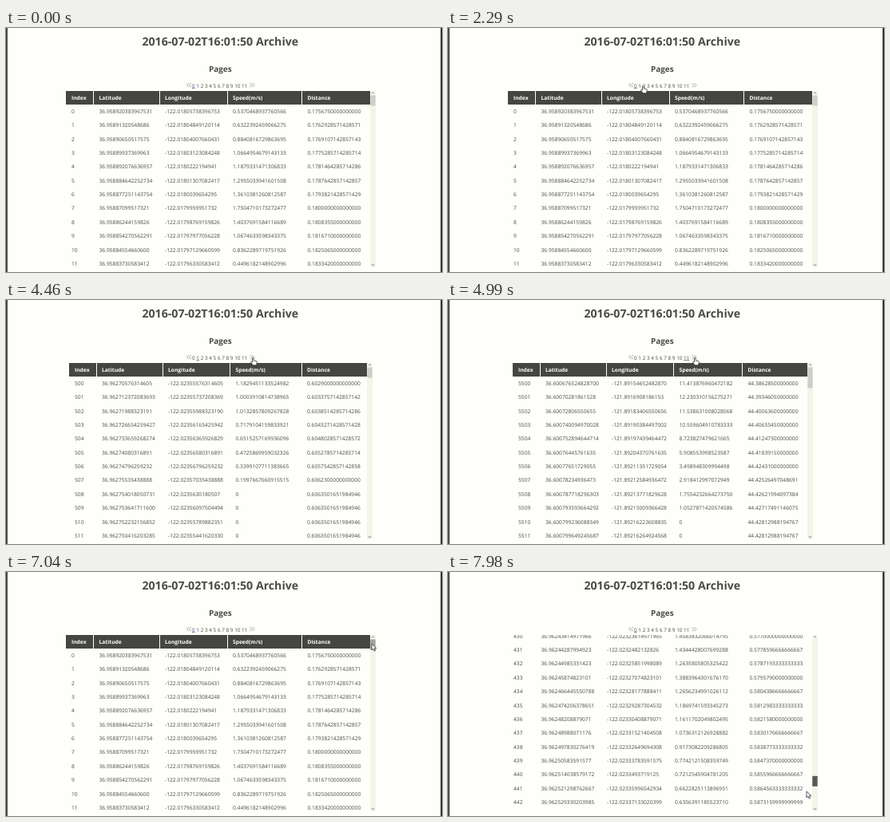
Recreate the animation shown at these times as an HTML page with a canvas. Size 546x306 px, loop 8 s.

```html
<!DOCTYPE html>
<html lang="en">
<head>
<meta charset="utf-8">
<title>Archive</title>
<style>
html, body { margin: 0; width: 100%; height: 100%; overflow: hidden; background: #fefefa; }
canvas { display: block; width: 546px; height: 306px; }
</style>
</head>
<body>
<canvas id="stage" width="546" height="306"></canvas>
<script>
const ctx = document.getElementById('stage').getContext('2d');
const LOOP = 8000, STEP = 820 / 14, CLICK = 3290;
const FONT = '"Open Sans", "Noto Sans", sans-serif';
const PAPER = '#fefefa', INK = '#4a4a46', DARK = '#454541', LINK = '#50507c';
const PITCH = 17.36, TOP = 79, BOTTOM = 300, FIRST_ROW = 104.5;
const HEADS = ['Index', 'Latitude', 'Longitude', 'Speed(m/s)', 'Distance'];

// Way points of the track: index, latitude, longitude, speed, distance.
const PAGES = {
  0: {
    base: 0, left: 75, right: 456, cols: [82, 116.5, 199, 284, 377.5], thumb: 13,
    track: [
      [0, 36.95892, -122.018057, 0.5417, 0.175675],
      [7, 36.95887, -122.017995, 1.6088, 0.18],
      [11, 36.958837, -122.017963, 0.4826, 0.183342],
      [177, 36.960214, -122.019939, 1.4364, 0.345098],
      [189, 36.960392, -122.020189, 1.4692, 0.362738],
      [430, 36.962434, -122.023236, 1.512, 0.577],
      [442, 36.962529, -122.023371, 0.624, 0.587316]
    ]
  },
  1: {
    base: 500, left: 79, right: 452, cols: [86, 120, 203, 287.5, 377], thumb: 13,
    track: [
      [500, 36.962705, -122.023555, 1.2244, 0.6029],
      [507, 36.962755, -122.02357, 0.1928, 0.60623],
      [508, 36.962754, -122.023563, 0, 0.6063501651984946],
      [511, 36.96275, -122.023554, 0, 0.6063501651984946]
    ]
  },
  11: {
    base: 5500, left: 81, right: 450, cols: [88, 122, 205, 289.5, 375.5], thumb: 26,
    track: [
      [5500, 36.600676, -121.891546, 11.1298, 44.386285],
      [5502, 36.600728, -121.891834, 12.3602, 44.400636],
      [5506, 36.600776, -121.892113, 3.8565, 44.42431],
      [5510, 36.600799, -121.892162, 0, 44.42812988194767]
    ]
  }
};

// Pointer tip and table offset over time.
const POINTER = [
  [1700, 440, 312], [2230, 243.5, 72], [3290, 243.5, 72], [3700, 287, 80],
  [4150, 308.5, 72], [5100, 308.5, 72], [5450, 270, 86], [5850, 229, 71],
  [6250, 229, 71], [6950, 458, 90], [7150, 458, 90], [7570, 452, 237], [7980, 449, 275]
];
const SCROLL = [[7200, 0], [7570, 3088], [7980, 7489]];

const ease = k => k * k * (3 - 2 * k);
const linear = k => k;

// Value along [position, ...values] keys, held at both ends.
function follow(keys, at, curve = linear) {
  const n = keys.findIndex(key => at <= key[0]);
  if (n === 0) return keys[0].slice(1);
  if (n < 0) return keys[keys.length - 1].slice(1);
  const a = keys[n - 1], b = keys[n];
  const k = curve((at - a[0]) / (b[0] - a[0]));
  return a.slice(1).map((v, j) => v + (b[j + 1] - v) * k);
}

const noise = n => {
  const v = Math.sin(n * 12.9898 + 4.1) * 43758.5453;
  return v - Math.floor(v);
};

function rowCells(track, i) {
  const [lat, lon, speed, dist] = follow(track, i);
  const drift = noise(i) * 1e-6;
  return [
    String(i),
    (lat + drift).toFixed(noise(i + 0.3) < 0.4 ? 15 : 14),
    (lon - drift).toFixed(noise(i + 0.6) < 0.2 ? 13 : 14),
    speed ? (speed * (0.9 + 0.2 * noise(i + 0.9))).toFixed(speed < 2 ? 16 : 15) : '0',
    dist.toFixed(dist < 1 ? 16 : 14)
  ];
}

const pageAt = t => t < CLICK ? 0 : t < 4500 ? 1 : t < 6100 ? 11 : 0;

const hold = t => Math.round((CLICK + Math.floor((t - CLICK) / STEP) * STEP) / 10) * 10;

function text(str, x, y, size, color = INK, weight = 400, align = 'left') {
  ctx.font = `${weight} ${size}px ${FONT}`;
  ctx.fillStyle = color;
  ctx.textAlign = align;
  ctx.fillText(str, x, y);
}

function box(x, y, w, h, color) {
  ctx.fillStyle = color;
  ctx.fillRect(x, y, w, h);
}

function chevron(x, y, dx, dy, color, width) {
  ctx.beginPath();
  if (dx > 0 && dy < 0) {
    ctx.moveTo(x - dx, y - dy);
    ctx.lineTo(x, y);
    ctx.lineTo(x + dx, y - dy);
  } else {
    ctx.moveTo(x - dx, y - dy);
    ctx.lineTo(x, y);
    ctx.lineTo(x - dx, y + dy);
  }
  ctx.strokeStyle = color;
  ctx.lineWidth = width;
  ctx.stroke();
}

function drawPager(page) {
  for (const [x, dir] of [[226.5, 1], [311, -1]]) {
    for (const shift of [0, 3]) chevron(x + shift * dir, 71.7, -2.6 * dir, 2.7, '#85857c', 0.7);
  }
  let x = 233;
  for (let n = 0; n < 12; n++) {
    const current = n === page;
    text(String(n), x, 74.6, 6.4, current ? LINK : INK);
    const w = ctx.measureText(String(n)).width;
    if (current) box(x, 75.4, w, 0.7, LINK);
    x += w + ctx.measureText(' ').width;
  }
}

function drawTable({ base, left, right, cols, track }, scroll) {
  ctx.save();
  ctx.beginPath();
  ctx.rect(left, TOP, right - left, BOTTOM - TOP);
  ctx.clip();
  box(left, TOP - scroll, right - left, 17, DARK);
  HEADS.forEach((head, c) => {
    if (c) box(Math.round(cols[c] - 7.4), TOP - scroll, 1, 17, PAPER);
    text(head, cols[c], 89.9 - scroll, 6.7, '#fffffa', 700);
  });
  const first = Math.max(0, Math.floor((scroll - 30) / PITCH));
  for (let i = first; i < first + 16; i++) {
    const y = FIRST_ROW + i * PITCH - scroll + 2.4;
    rowCells(track, base + i).forEach((cell, c) => text(cell, cols[c], y, 6.7));
  }
  ctx.restore();
}

function drawScrollbar({ right, thumb }, scroll, t) {
  const color = t >= 7150 ? '#585853' : t >= 6900 ? '#a3a39c' : '#cfcfc8';
  box(right, TOP, 7, BOTTOM - TOP, '#f4f4e8');
  box(right + 0.3, 84.5 + scroll / 8480 * 194, 6.4, thumb, color);
  chevron(right + 3.5, 80.7, 1.5, -1.3, '#77776c', 0.9);
  ctx.save();
  ctx.translate(right + 3.5, 298);
  ctx.scale(1, -1);
  chevron(0, 0, 1.5, -1.5, INK, 0.9);
  ctx.restore();
}

const ARROW = new Path2D('M0 0V8L1.9 6.3L3.2 9.2L4.6 8.6L3.3 5.8H5.8Z');
const HAND = new Path2D('M0 .8Q.8 -.4 1.6 .8V3.8L5.1 4.6Q6 5 5.8 6.2L5 9.8H.8L-2 6.2Q-1.9 4.9 -.9 5.3L0 6Z');

function drawPointer(t) {
  if (t < POINTER[0][0]) return;
  const [x, y] = follow(POINTER, t, t < 7150 ? ease : linear);
  const overLink = x > 225 && x < 312 && y > 68 && y < 77;
  const shape = overLink ? HAND : ARROW;
  ctx.save();
  ctx.translate(x, y);
  ctx.fillStyle = '#fffffa';
  ctx.fill(shape);
  ctx.strokeStyle = '#303030';
  ctx.lineWidth = 0.8;
  ctx.stroke(shape);
  ctx.restore();
}

function draw(t) {
  const id = pageAt(t), page = PAGES[id];
  const [scroll] = follow(SCROLL, t);
  box(0, 0, 546, 306, PAPER);
  box(0, 0, 2, 306, '#4c4c48');
  box(544, 0, 1, 306, '#6a6a66');
  box(545, 0, 1, 306, '#1c1c1c');
  text('2016-07-02T16:01:50 Archive', 268.3, 21.8, 14.2, INK, 700, 'center');
  text('Pages', 268.3, 55.3, 10, INK, 700, 'center');
  drawPager(id);
  drawTable(page, scroll);
  drawScrollbar(page, scroll, t);
  drawPointer(t);
}

ctx.textRendering = 'geometricPrecision';
const began = performance.now();
function tick() {
  draw(hold((performance.now() - began) % LOOP));
  requestAnimationFrame(tick);
}
tick();
</script>
</body>
</html>
```
